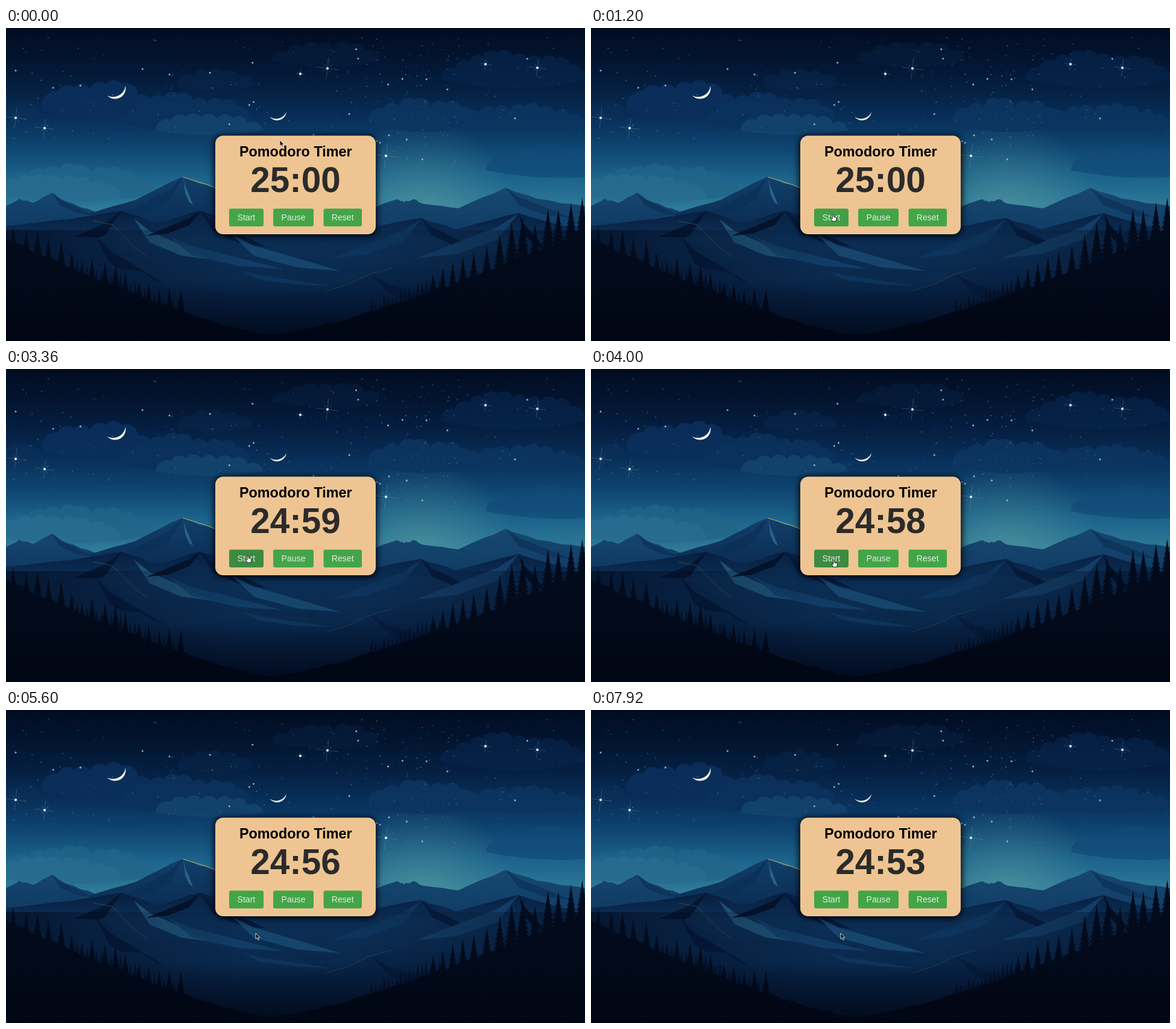
An HTML page with a canvas that plays this animation: 960 px wide and 519 px high, repeating every 8 s.

```html
<!DOCTYPE html>
<html lang="en">
<head>
<meta charset="utf-8">
<title>Pomodoro Timer</title>
<style>
html, body { margin: 0; width: 100%; height: 100%; overflow: hidden; background: #020a1c; }
canvas, svg { position: absolute; left: 0; top: 0; width: 960px; height: 519px; }
text { font-family: "Liberation Sans", Arial, sans-serif; text-anchor: middle; }
.card { fill: #eec592; filter: drop-shadow(0 1px 6px rgba(0, 4, 14, .9)) drop-shadow(0 2px 5px rgba(0, 4, 14, .5)); }
.title { font-size: 23.4px; font-weight: bold; }
.time { font-size: 58.5px; font-weight: bold; fill: #2b2b2b; }
.btn { fill: #43a548; }
.label { font-size: 14.1px; fill: #e6ebe3; }
</style>
</head>
<body>
<canvas id="scene" width="960" height="519"></canvas>
<svg viewBox="0 0 960 519">
  <rect class="card" x="347" y="178.5" width="266" height="163.5" rx="13"/>
  <text class="title" x="480.3" y="213">Pomodoro Timer</text>
  <text class="time" id="time" x="480" y="272">25:00</text>
  <rect class="btn" id="start" x="370" y="299.5" width="57" height="29.5" rx="3"/>
  <rect class="btn" x="443" y="299.5" width="67" height="29.5" rx="3"/>
  <rect class="btn" x="526.5" y="299.5" width="63.5" height="29.5" rx="3"/>
  <text class="label" x="398.4" y="319">Start</text>
  <text class="label" x="476.5" y="319">Pause</text>
  <text class="label" x="558.2" y="319">Reset</text>
  <g id="cursor" stroke-width=".9" stroke-linejoin="round">
    <path id="arrow" d="M0 0V9.6L2.2 7.7L3.8 11.3L5.4 10.6L3.9 7.2H6.9Z" fill="#05080f" stroke="#e8e8e8"/>
    <path id="hand" d="M-1 0Q0-1.2 1 0V3.6L5 4.6Q6 5 5.8 6.5L5 11H-.5L-3.6 6.6Q-3.6 5.3-2.4 5.7L-1 7Z" fill="#fff" stroke="#111"/>
  </g>
</svg>
<script>
const c = document.getElementById("scene").getContext("2d");
const $ = id => document.getElementById(id);

let seed = 11;
const rnd = () => (seed = (seed * 16807) % 2147483647) / 2147483647;
const clamp = v => Math.min(1, Math.max(0, v));
const ease = v => v * v * (3 - 2 * v);

function ramp(x0, y0, x1, y1, ...colors) {
  const g = c.createLinearGradient(x0, y0, x1, y1);
  colors.forEach((s, i) => g.addColorStop(i / (colors.length - 1), s));
  return g;
}
const down = (y0, y1, ...colors) => ramp(0, y0, 0, y1, ...colors);

function fill(d, style, alpha = 1) {
  c.globalAlpha = alpha;
  c.fillStyle = style;
  c.fill(new Path2D(d));
  c.globalAlpha = 1;
}

function stroke(d, color, width, alpha = 1) {
  c.globalAlpha = alpha;
  c.strokeStyle = color;
  c.lineWidth = width;
  c.stroke(new Path2D(d));
  c.globalAlpha = 1;
}

function dot(x, y, r, color, alpha = 1) {
  fill(`M${x - r} ${y}a${r} ${r} 0 0 1 ${2 * r} 0a${r} ${r} 0 0 1 ${-2 * r} 0`, color, alpha);
}

function glow(x, y, r, rgb, alpha) {
  const g = c.createRadialGradient(x, y, 0, x, y, r);
  g.addColorStop(0, `rgba(${rgb},${alpha})`);
  g.addColorStop(1, `rgba(${rgb},0)`);
  c.fillStyle = g;
  c.fillRect(x - r, y - r, 2 * r, 2 * r);
}

// Puffs along a sine arch of width w and height h above a soft base.
function cloud(x, y, w, h, color, alpha) {
  const n = Math.max(5, Math.round(w / 25));
  let d = `M${x} ${y}`, px = x, py = y;
  for (let i = 1; i <= n; i++) {
    const u = i / n, qx = x + w * u;
    const qy = y - h * Math.sqrt(Math.sin(Math.PI * Math.min(u, .9999))) * (.65 + .3 * rnd());
    const r = Math.hypot(qx - px, qy - py) * .6;
    d += `A${r} ${r} 0 0 1 ${qx} ${qy}`;
    px = qx;
    py = qy;
  }
  fill(`${d}Q${x + w * .6} ${y + h * .55} ${x} ${y}Z`, color, alpha);
}

function sparkle(x, y, size) {
  for (let i = 0; i < 8; i++) {
    const a = i * Math.PI / 4 + .12, r = size * (i % 2 ? .5 : 1);
    stroke(`M${x} ${y}l${Math.cos(a) * r} ${Math.sin(a) * r}`, "#8fbfd2", .6, .45);
  }
  dot(x, y, 2, "#eef8f8");
}

function crescent(x0, y0, x1, y1, r) {
  fill(`M${x0} ${y0}A${r} ${r} 0 0 0 ${x1} ${y1}A${r * 1.18} ${r * 1.18} 0 0 1 ${x0} ${y0}Z`, "#eef1e6");
}

// Skyline through key points, roughened between them.
function ridge(keys, style) {
  const p = keys.split(" ").map(s => s.split(",").map(Number));
  let d = `M${p[0]}`;
  for (let i = 1; i < p.length; i++) {
    const [ax, ay] = p[i - 1], [bx, by] = p[i];
    for (let u = .25; u < 1; u += .25) {
      d += `L${ax + (bx - ax) * u} ${ay + (by - ay) * u + (rnd() - .5) * 3}`;
    }
    d += `L${bx} ${by}`;
  }
  fill(`${d}V519H${p[0][0]}Z`, style);
}

// One sloping face that falls from a summit, dx to the side and h down.
function face(x, y, dx, h, color, alpha) {
  fill(`M${x} ${y}l${dx * .2} ${h * .3}l${dx * .35} ${h * .3}l${dx * .45} ${h * .4}` +
    `l${-dx * .4} ${-h * .1}l${-dx * .4} ${-h * .32}Z`, color, alpha);
}

function tree(x, y, h, style) {
  const n = Math.max(4, Math.round(h / 8)), w = h * .21;
  let left = "", right = "";
  for (let i = 1; i <= n; i++) {
    const yy = y + h * i / n, k = w * i / n;
    right += `L${x + k} ${yy}L${x + k * .5} ${yy - 2}`;
    left = `L${x - k * .5} ${yy - 2}L${x - k} ${yy}` + left;
  }
  fill(`M${x} ${y - 3}${right}${left}Z`, style);
}

function sky() {
  c.fillStyle = down(0, 300, "#020c22", "#03142f", "#051f41", "#082f59", "#0f4672", "#1d648c", "#2f7b98");
  c.fillRect(0, 0, 960, 519);
  glow(690, 300, 150, "110,175,165", .4);

  cloud(440, 55, 180, 34, "#061d3d", .7);
  cloud(285, 96, 125, 30, "#08264a", .6);
  cloud(720, 86, 240, 52, "#07244a", .7);
  cloud(0, 144, 55, 26, "#0c3158", .5);
  cloud(152, 190, 80, 14, "#0f3f6c", .5);
  cloud(60, 136, 185, 52, "#0a2f5b", .9);
  cloud(190, 158, 215, 52, "#0b315c", .9);
  cloud(248, 170, 178, 28, "#164873", .7);
  cloud(600, 160, 180, 46, "#0c3561", .85);
  cloud(735, 162, 225, 34, "#0c3561", .8);
  cloud(796, 236, 230, 46, "#124b78", .7);
  cloud(-40, 275, 285, 50, "#226489", .75);
  cloud(-30, 285, 220, 46, "#2d7396", .5);
}

function stars() {
  for (let i = 0; i < 230; i++) {
    const near = i % 3 === 0;
    const x = near ? 570 + rnd() * 180 : rnd() * 960;
    const y = 15 + rnd() * (near ? 215 : 170);
    const big = rnd() > .85;
    dot(x, y, big ? 1.6 : .5 + rnd() * .6, big ? "#9ccbe2" : "#6ba6c9", big ? .8 : .5);
  }
  sparkle(16, 149, 18);
  sparkle(64, 166, 16);
  sparkle(533, 67, 18);
  sparkle(488, 76, 7);
  sparkle(795, 60, 10);
  sparkle(881, 66, 14);
  sparkle(630, 212, 20);
  crescent(168, 112, 198, 96, 17.6);
  crescent(437, 147, 465, 139, 15.6);
}

function mountains() {
  ridge("0,295 22,283 45,290 76,273 100,288 148,305 200,300", down(272, 330, "#164670", "#0f3a63"));
  face(76, 273, 70, 38, "#0c2f56", .7);
  ridge("140,307 215,285 293,247 347,266 420,300", down(247, 330, "#123f69", "#0b2c53"));
  face(293, 247, -110, 68, "#0b2f57", .7);
  face(294, 248, 16, 45, "#2f6f8c", .8);
  stroke("M293 247L312 253L334 260L349 266", "#c0b365", 1.3, .9);
  ridge("600,302 648,284 660,289 674,284 696,292 750,299 828,265 880,283 960,295", down(264, 335, "#17486f", "#103d67"));
  face(828, 265, 110, 50, "#0c3158", .7);

  ridge("0,328 105,317 192,303 250,324 322,303 420,335 560,338 688,315 746,334 850,307 960,340",
    down(303, 440, "#071f40", "#0c2f56", "#0b2b50", "#08213f"));
  face(192, 303, -140, 70, "#04152f", .9);
  face(212, 316, 130, 68, "#245b7d", .8);
  face(322, 303, -90, 42, "#041029", .9);
  face(322, 303, 110, 60, "#06193a", .9);
  face(270, 345, 190, 55, "#123f68", .9);
  face(375, 343, 180, 60, "#1a4c74", .8);
  face(688, 315, 90, 50, "#061b3a", .9);
  face(688, 317, -150, 65, "#0f365f", .9);
  face(850, 307, -170, 75, "#14406a", .9);
  face(850, 307, 45, 60, "#030f26", 1);
  stroke("M145 320L176 326L212 363L232 378", "#8f8a56", .8, .45);

  ridge("0,346 150,347 215,380 300,381 390,402 530,415 625,398 760,376 960,366",
    down(350, 480, "#0b2c54", "#0a294d", "#061b3a"));
  face(390, 402, 150, 26, "#123d66", .6);
  face(150, 347, 110, 75, "#06193a", .9);
  ridge("100,396 226,404 270,431 380,443 530,437 604,408 640,398 960,405", down(398, 505, "#09274c", "#072041", "#041530"));
  face(604, 408, 170, 60, "#06193a", .7);
  stroke("M530 437L570 424L604 408L640 398", "#6f8060", .7, .4);

  // both flanks sink into shadow
  c.fillStyle = ramp(0, 0, 960, 0, "rgba(2,10,28,.65)", "rgba(2,10,28,.25)", "rgba(2,10,28,0)", "rgba(2,10,28,0)", "rgba(2,10,28,.2)", "rgba(2,10,28,.5)");
  c.fillRect(0, 335, 960, 184);
}

const valley = x => 507 - (x < 440 ? 160 : 172) * Math.pow(Math.abs(x - 440) / (x < 440 ? 440 : 520), 1.3);

function forest() {
  const dark = down(300, 519, "#020b1d", "#020a1a", "#010614");
  for (let x = 110; x < 290; x += 8) tree(x, valley(x) - 8 - rnd() * 14, 34, "#031027");
  for (let x = 606; x < 720; x += 7) tree(x, valley(x) - 8 - rnd() * 12, 30, "#031027");

  let d = "M0 519";
  for (let x = 0; x <= 960; x += 12) d += `L${x} ${valley(x) + rnd() * 4}`;
  fill(d + "V519Z", dark);

  for (let x = 12; x < 290; x += 16 + rnd() * 6) {
    const up = 14 + rnd() * 20;
    tree(x, valley(x) - up, up * 1.7, dark);
  }
  for (let x = 708; x < 960; x += 16 + rnd() * 6) {
    const up = 22 + 40 * clamp((x - 700) / 130) * (.5 + .5 * rnd());
    tree(x, valley(x) - up, up * 1.4, dark);
  }
  c.fillStyle = down(420, 519, "rgba(1,6,20,0)", "rgba(1,6,20,.6)");
  c.fillRect(0, 420, 960, 99);
}

sky();
stars();
mountains();
forest();

const LOOP = 8000, STEP = 80, TICK = 880, FIRST = 2560;
const ENTER = 1120, LEAVE = 4120, FADE = 300;
// time, x, y of the pointer tip
const stops = [[200, 454, 186], [1240, 401, 310], [3840, 401, 310], [4480, 411, 357], [4640, 411, 357], [5040, 414, 370]];

function pointer(t) {
  const i = Math.max(1, stops.findIndex(s => s[0] > t));
  const [a, b] = t >= 5040 ? stops.slice(-2) : [stops[i - 1], stops[i]];
  const k = ease(clamp((t - a[0]) / (b[0] - a[0])));
  return [a[1] + (b[1] - a[1]) * k, a[2] + (b[2] - a[2]) * k];
}

function draw(now) {
  const t = Math.floor((now % LOOP) / STEP) * STEP;
  const left = 1500 - Math.max(0, 1 + Math.floor((t - FIRST) / TICK));
  $("time").textContent = Math.floor(left / 60) + ":" + String(left % 60).padStart(2, "0");

  const [x, y] = pointer(t);
  const over = y > 299.5 && y < 329;
  $("cursor").setAttribute("transform", `translate(${x} ${y})`);
  $("arrow").style.display = over ? "none" : "";
  $("hand").style.display = over ? "" : "none";

  const hover = clamp((t - ENTER) / FADE) - clamp((t - LEAVE) / FADE);
  const mix = (a, b) => Math.round(a + (b - a) * hover);
  $("start").style.fill = `rgb(${mix(67, 60)},${mix(165, 139)},${mix(72, 65)})`;
}

const t0 = performance.now();
function frame() {
  draw(performance.now() - t0);
  requestAnimationFrame(frame);
}
frame();
</script>
</body>
</html>
```
